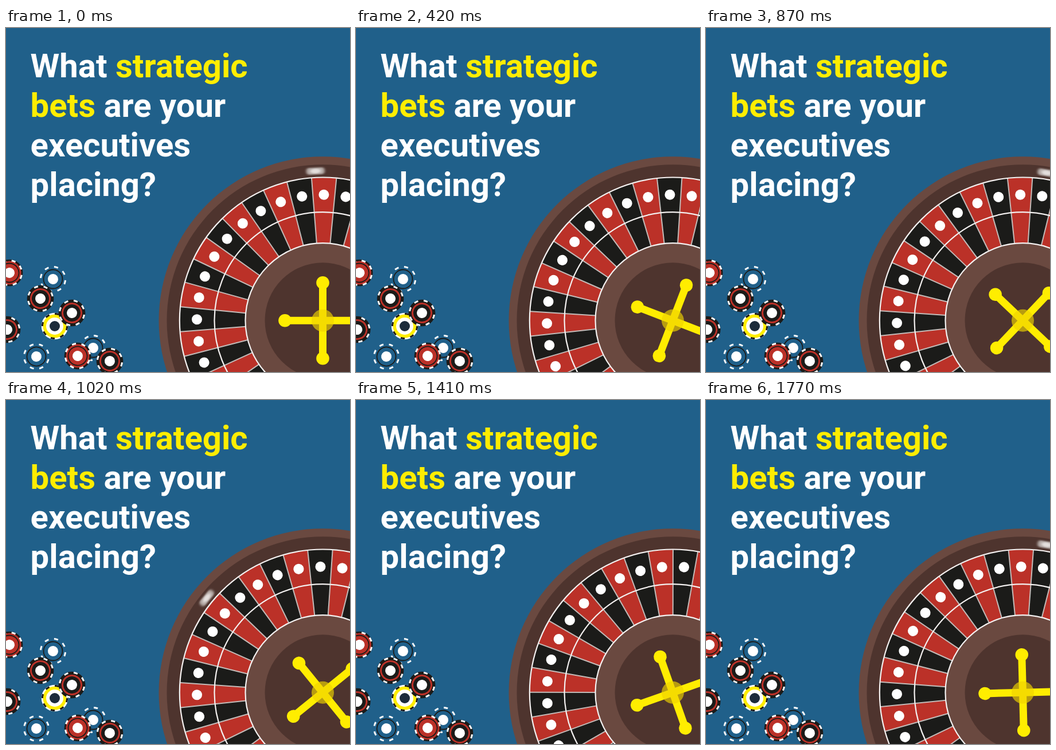
Recreate the animation shown at these times as an HTML page. Size 600 by 600 pixels, loop 1800 ms.

```html
<!DOCTYPE html>
<html lang="en">
<head>
<meta charset="utf-8">
<title>Strategic bets</title>
<style>
  html, body { margin: 0; width: 100%; height: 100%; overflow: hidden; background: #20608a; }
  svg { display: block; width: 100vw; height: 100vh; }
  text { font: 700 58px Roboto, Arial, sans-serif; fill: #fff; }
  .key { fill: #ffed00; }
</style>
</head>
<body>
<svg viewBox="0 0 600 600">
  <defs>
    <filter id="soft" x="-50%" y="-100%" width="200%" height="300%">
      <feGaussianBlur stdDeviation="2 1"/>
    </filter>
  </defs>
  <text>
    <tspan x="42.6" y="86.2">What <tspan class="key">strategic</tspan></tspan>
    <tspan x="42.6" y="155" class="key">bets</tspan> are your
    <tspan x="42.6" y="223.8">executives</tspan>
    <tspan x="42.6" y="292.5">placing?</tspan>
  </text>
  <g id="chips"></g>
  <g transform="translate(552.5 510.2)">
    <circle r="286" fill="#6a4940"/>
    <circle r="272" fill="#4e342e"/>
    <g id="ball" filter="url(#soft)">
      <rect x="-16" y="-267" width="32" height="12" rx="5" fill="#b5aba7"/>
      <ellipse cy="-261" rx="9" ry="4" fill="#e4dfdd"/>
    </g>
    <g id="wheel"></g>
    <g fill="none" stroke="#f4f1f0" stroke-width="2.2">
      <circle r="249.7"/>
      <circle r="189"/>
      <circle r="135" fill="#6a4940"/>
    </g>
    <circle r="101" fill="#4e342e"/>
    <g id="cross" fill="#ffed00"></g>
    <circle r="19.5" fill="#f0d400" opacity=".65"/>
  </g>
</svg>
<script>
const $ = id => document.getElementById(id);
const RED = '#bb3128', BLACK = '#1b1b19', BLUE = '#20608a', YELLOW = '#ffed00', WHITE = '#fff';

// Kinds: edge, base, rim dashes, ring, ring width, centre, emblem
const kinds = {
  blue: [BLUE, BLUE, WHITE, BLACK, 1.8, BLUE, WHITE],
  black: [BLACK, BLACK, WHITE, RED, 3, BLACK, WHITE],
  red: [BLACK, RED, WHITE, BLACK, 1.8, RED, WHITE],
  yellow: [WHITE, YELLOW, BLACK, YELLOW, 3, WHITE, '#1c2b3a']
};

function chip(kind, x, y, turn) {
  const [edge, base, dash, ring, width, centre, emblem] = kinds[kind];
  return `<g transform="translate(${x} ${y}) rotate(${turn})">
    <circle r="23.3" fill="${edge}"/>
    <circle r="20.5" fill="${base}"/>
    <circle r="21.6" fill="none" stroke="${dash}" stroke-width="3" pathLength="16" stroke-dasharray=".85 1.15"/>
    <circle r="16.5" fill="${centre}" stroke="${ring}" stroke-width="${width}"/>
    <circle r="9" fill="${emblem}"/></g>`;
}

$('chips').innerHTML = [
  ['red', 6, 427, 10], ['blue', 82, 438, 5], ['black', 60, 472, 15],
  ['yellow', 85, 520, 0], ['black', 115, 497, 8], ['black', 2, 526, 20],
  ['blue', 53, 573, 12], ['blue', 152, 558, 3], ['red', 125, 572, 18],
  ['black', 181, 581, 6]
].map(c => chip(...c)).join('');

// A pocket is 10 degrees wide, centred on twelve o'clock before turning
const ray = (r, deg) => [r * Math.sin(deg * Math.PI / 180), -r * Math.cos(deg * Math.PI / 180)].join(' ');
const pocket = `M${ray(134, -5)}L${ray(249, -5)}A249 249 0 0 1 ${ray(249, 5)}L${ray(134, 5)}Z`;
$('wheel').innerHTML = Array.from({ length: 36 }, (_, i) =>
  `<g transform="rotate(${i * 10})">
    <path d="${pocket}" fill="${i % 2 ? BLACK : RED}"/>
    <circle cy="-219.5" r="9" fill="#fff"/></g>`).join('') +
  Array.from({ length: 36 }, (_, i) =>
    `<path d="M${ray(135, i * 10 - 5)}L${ray(249, i * 10 - 5)}" stroke="#c3bbb8" stroke-width="2"/>`).join('');

$('cross').innerHTML = [0, 90, 180, 270].map(a =>
  `<g transform="rotate(${a})"><path d="M-6.5 0V-66H6.5V0Z"/><circle cy="-66" r="11.3"/></g>`).join('');

const turn = (id, deg) => $(id).setAttribute('transform', `rotate(${deg})`);

function draw(now) {
  const t = Math.floor(now % 1800 / 30) * 30;
  turn('wheel', 0.5 + t * 0.0671);
  turn('cross', t * 0.05);
  turn('ball', -2.8 - t * 0.4);
}

const start = performance.now();
function tick() {
  draw(performance.now() - start);
  requestAnimationFrame(tick);
}
tick();
</script>
</body>
</html>
```
